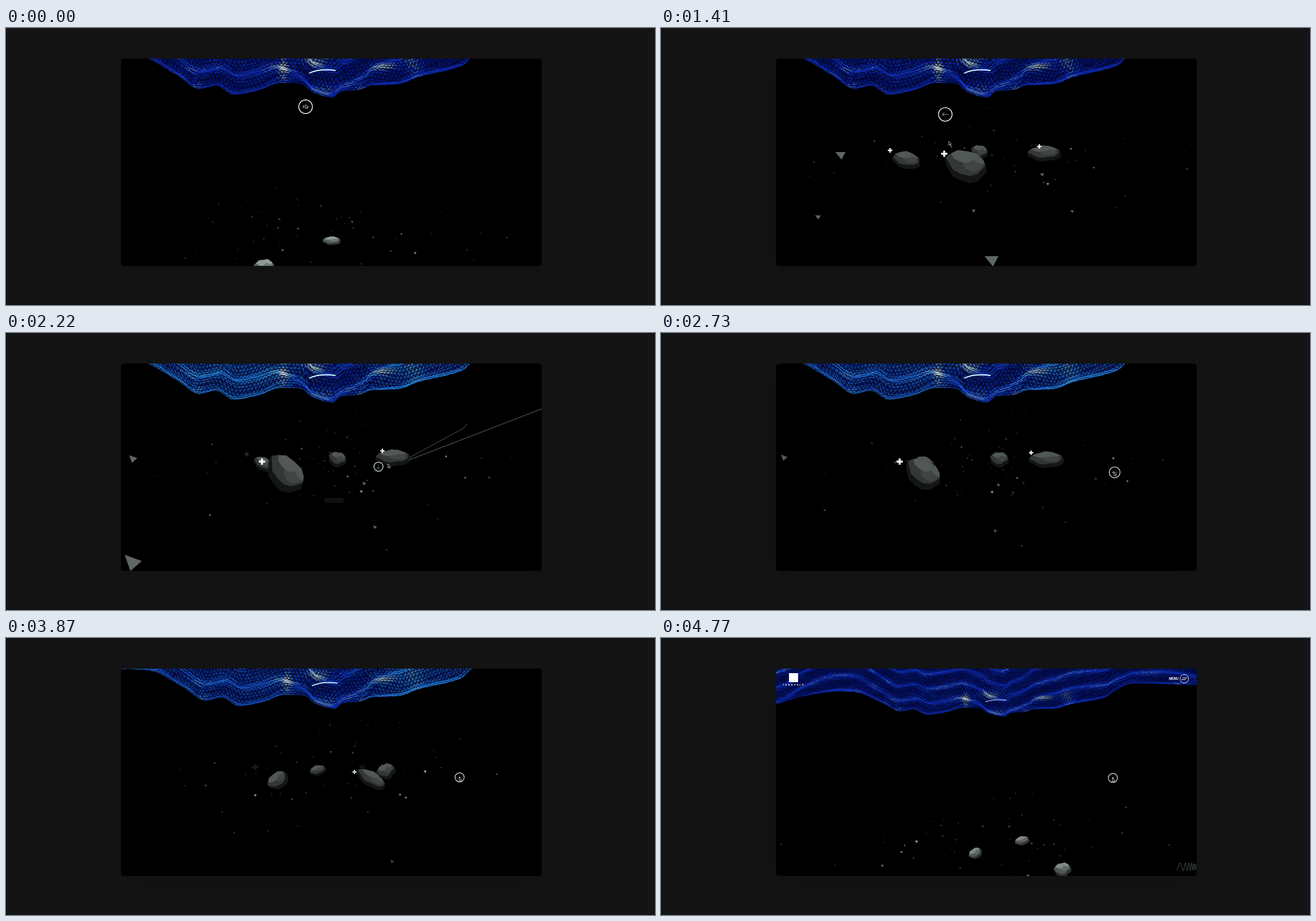
Animation, 1146 px wide and 489 px high, one loop 4.8 s. Source, as an HTML page with a canvas:

```html
<!DOCTYPE html>
<html lang="en">
<head>
<meta charset="utf-8">
<title>Orbiting rocks</title>
<style>
  html, body { margin: 0; width: 100%; height: 100%; overflow: hidden; background: #141414; }
  canvas { position: absolute; left: 0; top: 0; }
  #shade { position: absolute; left: 203px; top: 54px; width: 743px; height: 366px; border-radius: 5px;
    box-shadow: 0 8px 36px rgba(0, 0, 0, .16); }
  #ui { position: absolute; inset: 0; color: #fff; font-family: Inter, sans-serif; font-weight: 700; opacity: 0; }
  #ui span { position: absolute; white-space: nowrap; line-height: 8px; }
  #name { left: 215px; top: 79px; font-size: 4px; letter-spacing: 2.2px; }
  #menu { left: 897px; top: 68px; font-size: 5.6px; }
</style>
</head>
<body>
<div id="shade"></div>
<canvas id="stage" width="1146" height="489"></canvas>
<div id="ui"><span id="name">TARNVELD</span><span id="menu">MENU</span></div>
<script>
const LOOP = 4800;
const ctx = document.getElementById('stage').getContext('2d');
const ui = document.getElementById('ui');
const clamp = (v, a = 0, b = 1) => Math.min(b, Math.max(a, v));
const smooth = (a, b, t) => { const u = clamp((t - a) / (b - a)); return u * u * (3 - 2 * u); };
const mix = (a, b, u) => a + (b - a) * u;
const grey = (v, a = 1) => `rgba(${v * .95 | 0},${v * 1.03 | 0},${v * 1.02 | 0},${a})`;

function random(seed) {
  return () => {
    seed = (seed + 0x6D2B79F5) | 0;
    let n = Math.imul(seed ^ seed >>> 15, 1 | seed);
    n = n + Math.imul(n ^ n >>> 7, 61 | n) ^ n;
    return ((n ^ n >>> 14) >>> 0) / 4294967296;
  };
}

// Monotone cubic through keys of the form [x, value, value, ...]
function at(keys, x) {
  const last = keys.length - 1;
  if (x <= keys[0][0]) return keys[0].slice(1);
  if (x >= keys[last][0]) return keys[last].slice(1);
  let i = 0;
  while (keys[i + 1][0] < x) i++;
  const h = keys[i + 1][0] - keys[i][0], u = (x - keys[i][0]) / h;
  const slope = (k, n) => (keys[k + 1][n] - keys[k][n]) / (keys[k + 1][0] - keys[k][0]);
  const tangent = (k, n) => {
    if (k === 0) return slope(0, n);
    if (k === last) return slope(last - 1, n);
    const a = slope(k - 1, n), b = slope(k, n);
    return a * b > 0 ? 2 * a * b / (a + b) : 0;
  };
  return keys[i].slice(1).map((a, m) => {
    const n = m + 1, d = keys[i + 1][n] - a;
    const p = tangent(i, n) * h, q = tangent(i + 1, n) * h;
    return a + u * (p + u * (3 * d - 2 * p - q + u * (p + q - 2 * d)));
  });
}

// Paths share these times; each pose is x, y, width
const TIMES = [0, 780, 1410, 2220, 3240, 4260, 4770];
const path = (first, ...poses) => poses.map((pose, i) => [TIMES[first + i], ...pose]);

function polygon(points, fill) {
  ctx.beginPath();
  points.forEach(([x, y]) => ctx.lineTo(x, y));
  ctx.closePath();
  ctx.fillStyle = fill;
  ctx.fill();
}

function line(points, color, width) {
  ctx.beginPath();
  points.forEach(([x, y]) => ctx.lineTo(x, y));
  ctx.strokeStyle = color;
  ctx.lineWidth = width;
  ctx.stroke();
}

function ring(x, y, r, color, width, turn = 1) {
  ctx.beginPath();
  ctx.arc(x, y, r, 0, turn * Math.PI * 2);
  ctx.strokeStyle = color;
  ctx.lineWidth = width;
  ctx.stroke();
}

// ---- wire terrain -------------------------------------------------------
const EDGE = [[60, 85], [133, 60], [203, 48], [236, 50], [300, 83], [340, 107], [372, 101], [405, 117],
  [440, 111], [485, 96], [520, 98], [540, 113], [577, 122], [592, 111], [627, 108], [645, 101],
  [690, 99], [725, 86], [806, 65], [820, 52], [870, 25], [1020, 30]];
// Lit patches: x, y, half width, half height, strength
const GLOW = [[489, 72, 7, 28, 2.6], [545, 58, 32, 12, 1.7], [565, 104, 16, 9, 1.2], [668, 70, 24, 6, 2.2],
  [718, 70, 15, 17, 1.9], [337, 100, 9, 6, 1.6], [440, 64, 60, 9, .9], [624, 107, 8, 3, 2.5]];
const COLORS = [[2, 12, 82], [8, 28, 148], [18, 52, 204], [82, 128, 198], [178, 202, 196], [255, 255, 250]];
const cyan = ([r, g, b]) => [r * .8 + 25, mix(g, b, .6), mix(b, 255, .4)];
const mesh = [0, 1, 2].map(() => COLORS.map(() => new Path2D()));
const body = new Path2D();

(function buildMesh() {
  const rnd = random(8), cols = 150, rows = 38, grid = [];
  for (let i = 0; i < cols; i++) {
    const u = 30 + i * 6.6, col = [];
    let [y] = at(EDGE, u);
    body.lineTo(u, y);
    for (let j = 0; j < rows; j++) {
      const fold = Math.sin(j * .62 + Math.sin(u / 41) * 1.5 + Math.cos(u / 83) * 1.9);
      const gap = (j < 3 ? 2 : 4.2) + 2.6 * fold;
      const x = u + 2.6 * Math.sin(j * .45 + u / 37) + (j % 2) * 3.3 + rnd() - .5;
      col.push({ x, y: y + (rnd() - .5) * .9, gap });
      y -= Math.max(1.5, gap);
    }
    grid.push(col);
  }
  body.lineTo(1020, -70);
  body.lineTo(30, -70);
  const edge = (a, b) => {
    if (b.y < -30) return;
    let v = a.gap < 3.2 ? 2 : a.gap < 5.4 ? 1.5 : .9;
    v += .35 * Math.sin(a.x / 27 + a.y / 9);
    for (const [x, y, w, h, s] of GLOW)
      v += s * Math.exp(-(((a.x - x) / w) ** 2) - ((a.y - y) / h) ** 2);
    const place = a.x + 90 * (rnd() - .5);
    const zone = place < 525 ? 0 : place < 650 ? 1 : 2;
    const lines = mesh[zone][clamp(Math.round(v + (rnd() - .5) * .7), 0, 5)];
    lines.moveTo(a.x, a.y);
    lines.lineTo(b.x, b.y);
  };
  for (let i = 0; i < cols - 1; i++)
    for (let j = 0; j < rows - 1; j++) {
      const a = grid[i][j], right = grid[i + 1];
      edge(a, right[j]);
      edge(a, grid[i][j + 1]);
      if (j % 2) edge(a, right[j + 1]);
      else edge(right[j], grid[i][j + 1]);
    }
})();

function drawMesh(t) {
  const p = smooth(3600, 4770, t);
  const sx = 1 - .22 * p, sy = 1 - .4 * p;
  const on = smooth(1500, 2200, t) * (1 - smooth(4300, 4740, t));
  const tint = [on * mix(.85, .45, smooth(2300, 3200, t)), on * .15, on * .87];
  ctx.save();
  ctx.transform(sx, 0, 0, sy, 577 + 29 * p - 577 * sx, 122 + 16 * p - 122 * sy);
  ctx.fillStyle = '#01062c';
  ctx.fill(body);
  ctx.lineWidth = .85;
  mesh.forEach((levels, zone) => levels.forEach((lines, n) => {
    const to = cyan(COLORS[n]);
    ctx.strokeStyle = `rgb(${COLORS[n].map((c, k) => mix(c, to[k], tint[zone]) | 0)})`;
    ctx.stroke(lines);
  }));
  ctx.beginPath();
  ctx.moveTo(535, 80);
  ctx.quadraticCurveTo(553, 71, 582, 75);
  ctx.strokeStyle = '#d8f4ff';
  ctx.lineWidth = 1.8;
  ctx.stroke();
  ctx.restore();
}

// ---- rocks --------------------------------------------------------------
function rock(seed, ratio, tilt, since, ...poses) {
  const rnd = random(seed);
  const outline = Array.from({ length: 15 }, (_, i) => {
    const a = i / 15 * Math.PI * 2, r = .88 + rnd() * .24;
    return [Math.cos(a) * r, Math.sin(a) * r];
  });
  return { ratio, tilt, since, outline, keys: path(0, ...poses) };
}

const right = rock(31, .5, .7, 3300, [575, 376, 30], [641, 218, 40], [677, 222, 56], [684, 221, 59],
  [674, 232, 58], [620, 271, 50], [590, 475, 40]);
const back = rock(38, .82, .3, 900, [456, 423, 36], [506, 225, 32], [562, 219, 30], [585, 223, 32],
  [613, 224, 33], [700, 252, 33], [709, 409, 30]);
const left = rock(45, .6, .4, 1200, [395, 500, 40], [421, 244, 62], [434, 234, 50], [455, 232, 38],
  [480, 229, 35], [600, 241, 27], [638, 358, 26]);
const front = rock(52, .66, .75, 1200, [700, 520, 50], [640, 242, 77], [540, 245, 79], [494, 250, 80],
  [446, 250, 56], [515, 253, 34], [556, 380, 26]);

function drawRock({ ratio, tilt, since, outline, keys }, t) {
  const [x, y, w] = at(keys, t), h = w * ratio;
  const light = .38 + .6 * (1 - smooth(0, 780, t)) + .45 * smooth(4260, 4770, t);
  const shape = (dx, dy, k, fill) =>
    polygon(outline.map(([a, b]) => [(a * k + dx) * w / 2, (b * k + dy) * h / 2]), fill);
  ctx.save();
  ctx.translate(x, y);
  ctx.rotate(tilt * Math.sin(Math.max(0, t - since) / 650));
  shape(0, 0, 1, grey(22 + 60 * (light - .38)));
  ctx.clip();
  shape(-.08, -.42, .96, grey(30 + light * 65));
  shape(.22, -.3, .5, grey(38 + light * 78));
  shape(-.3, -.92, .68, grey(46 + light * 105));
  shape(.55, -.95, .5, grey(38 + light * 120));
  ctx.restore();
}

// A plus sign that drifts across its rock between two times
function drawMark(t, { keys }, from, to, dy, size, start, end, out) {
  const [x, y] = at(keys, t);
  const alpha = smooth(start - 250, start, t) * (1 - smooth(out, out + 700, t));
  const cx = x + mix(from, to, smooth(start, end, t)), cy = y + dy, b = size * .32, arm = (size - b) / 2;
  ctx.fillStyle = `rgba(255,255,255,${alpha})`;
  ctx.fillRect(cx - size / 2, cy - b / 2, size, b);
  ctx.fillRect(cx - b / 2, cy - size / 2, b, arm);
  ctx.fillRect(cx - b / 2, cy + b / 2, b, arm);
}

// ---- debris -------------------------------------------------------------
const dustRnd = random(77);
const DUST = Array.from({ length: 84 }, () => ({
  angle: dustRnd() * 6.283,
  radius: 50 + dustRnd() ** 1.4 * 330,
  lift: (dustRnd() + dustRnd() + dustRnd() - 1.5) * 75,
  size: .7 + dustRnd() ** 3 * 1.7,
  light: 35 + dustRnd() ** 2 * 130
}));

function drawDust(t) {
  const spin = t / 2100 + smooth(3300, 4700, t);
  const drop = 135 * (1 - clamp(t / 780)) ** 3 + 125 * clamp((t - 3500) / 1270) ** 3;
  for (const d of DUST) {
    const z = Math.sin(d.angle + spin), k = 1 + .35 * z * d.radius / 300, s = d.size * k;
    const x = 565 + Math.cos(d.angle + spin) * d.radius * k;
    const y = 228 + drop + d.lift * k + 16 * z;
    polygon([[x - s, y - s * .6], [x + s, y - s * .6], [x + s * .2, y + s]], grey(d.light));
  }
}

const SHARDS = [
  path(1, [831, 373, 23], [584, 411, 25], [221, 407, 32]),
  path(1, [354, 241, 8], [317, 225, 18], [223, 223, 15], [212, 218, 9]),
  path(1, [407, 293, 5], [277, 334, 10]),
  path(2, [726, 324, 6], [651, 343, 7], [517, 353, 6], [327, 336, 2]),
  path(2, [673, 259, 7], [632, 266, 7], [560, 271, 6], [512, 275, 2]),
  path(1, [690, 371, 2], [552, 323, 7], [360, 322, 5], [227, 299, 4]),
  path(3, [672, 383, 3], [596, 366, 4], [460, 306, 2]),
  path(4, [938, 380, 10], [523, 404, 6])
];

function drawShard(keys, t) {
  const start = keys[0][0], end = keys[keys.length - 1][0];
  if (t < start - 150 || t > end + 150) return;
  const [x, y, w] = at(keys, t);
  const light = 100 + 120 * (1 - smooth(780, 1300, t)) - 40 * smooth(2400, 3240, t);
  ctx.save();
  ctx.translate(x, y);
  ctx.rotate(.75 * (1 - smooth(780, 1410, t)) + .35 * smooth(1500, 2220, t));
  polygon([[-w / 2, -w * .33], [w / 2, -w * .33], [w * .1, w * .4]], grey(light));
  ctx.restore();
}

function drawFlashes(t) {
  const near = (when, span) => clamp(1 - Math.abs(t - when) / span);
  line([[740, 220], [747, 212]], grey(225, near(780, 180)), 2.4);
  const ray = near(2220, 240);
  line([[712, 224], [946, 134]], grey(105, ray), 1);
  line([[712, 220], [808, 168], [814, 160]], grey(85, ray), 1);
  ctx.fillStyle = grey(18, ray);
  ctx.fillRect(563, 291, 33, 9);
}

// ---- cursor -------------------------------------------------------------
const RING = [[0, 529, 139], [780, 529, 134.5], [1200, 528, 135], [1410, 502, 152.5], [2000, 610, 232],
  [2220, 657.5, 236], [2700, 801, 246], [4500, 801, 246], [4770, 798, 247]];
const POINTER = [[0, 529, 135], [1150, 527, 134], [1410, 508, 200], [2220, 674, 231], [2650, 800, 245],
  [4500, 800, 246], [4770, 797, 247]];

function drawCursor(t) {
  const [x, y] = at(RING, t), [px, py] = at(POINTER, t);
  const small = smooth(1500, 2000, t) - smooth(2600, 2900, t) + smooth(3550, 3750, t);
  const r = 12 - 4 * small;
  ring(x, y, r, small < .5 ? '#fff' : '#c4d4d2', 1.4);
  const hold = clamp((t - 3190) / 480);
  if (hold && t < 3750) ring(x, y, r, '#f01428', 2, hold);
  ctx.save();
  ctx.translate(x, y);
  if (t > 3700) {
    ctx.fillStyle = '#fff';
    ctx.fillRect(-1, -1, 2, 2);
  } else {
    if (t > 1900 && t < 2600) ctx.rotate(-Math.PI / 2);
    ctx.scale(r / 12, r / 12);
    line([[6, 0], [-5, 0]], '#8b9694', 1);
    line([[-2, -3], [-5, 0], [-2, 3]], '#c8d0ce', 1);
  }
  ctx.restore();
  const arrow = [[0, 0], [0, 7], [2, 5.5], [3.5, 8], [3, 5.2], [5, 5]].map(([a, b]) => [px + a, py + b]);
  polygon(arrow, '#111');
  line([...arrow, arrow[0]], '#c8c8c8', .8);
}

function drawHeader(alpha) {
  ctx.globalAlpha = alpha;
  ctx.fillStyle = '#fff';
  ctx.fillRect(226, 62, 16, 16);
  ring(924, 72, 7.5, '#dfe6f5', 1);
  line([[921, 70.5], [929, 70.5]], '#fff', 1);
  line([[919, 73.5], [927, 73.5]], '#fff', 1);
  const wave = Array.from({ length: 36 }, (_, i) => [910 + i, 404 + 7 * Math.sin(i * i / 50 + i / 4 + 2)]);
  line(wave, '#46504e', 1);
  ctx.globalAlpha = 1;
}

function draw(t) {
  ctx.clearRect(0, 0, 1146, 489);
  ctx.save();
  ctx.beginPath();
  ctx.roundRect(203, 54, 743, 366, 5);
  ctx.fillStyle = '#000';
  ctx.fill();
  ctx.clip();
  drawDust(t);
  drawMesh(t);
  [right, back, left, front].forEach(r => drawRock(r, t));
  drawFlashes(t);
  SHARDS.forEach(keys => drawShard(keys, t));
  drawMark(t, left, -18, -30, -18, 8, 780, 1500, 1700);
  drawMark(t, front, 11, -42, -23, 11, 780, 1500, 3300);
  drawMark(t, right, -9, -29, -13, 7.5, 1410, 3000, 3700);
  drawCursor(t);
  const alpha = smooth(4450, 4740, t);
  drawHeader(alpha);
  ui.style.opacity = alpha;
  ctx.restore();
}

const start = performance.now();
function frame() {
  draw((performance.now() - start) % LOOP);
  requestAnimationFrame(frame);
}
frame();
</script>
</body>
</html>
```
